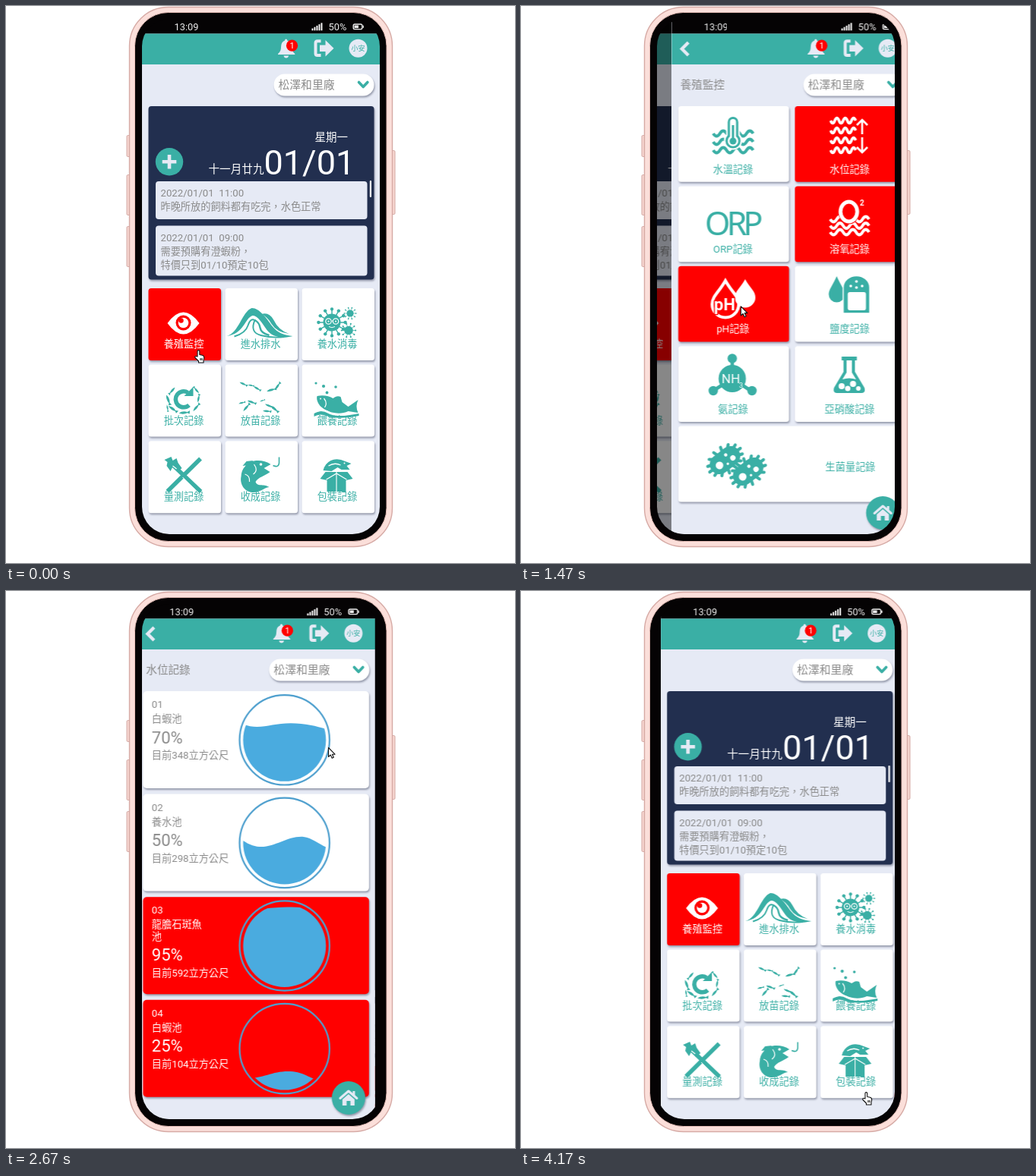
Animation, 670 px wide and 734 px high, one loop 4200 ms. Source, as an HTML page:

```html
<!DOCTYPE html>
<html lang="zh-Hant">
<head>
<meta charset="utf-8">
<title>養殖監控</title>
<style>
html, body { margin: 0; width: 100%; height: 100%; overflow: hidden; background: #fff; }
#stage { position: relative; width: 670px; height: 734px; overflow: hidden; }
#phone, #cursor { position: absolute; left: 0; top: 0; }
#display { position: absolute; left: 178.5px; top: 17px; width: 313px; height: 679px; border-radius: 36px; overflow: hidden; background: #050304; }
.page { position: absolute; left: 0; top: 0; width: 313px; height: 679px; will-change: transform; }
#notch { position: absolute; left: 92px; top: 0; width: 118px; height: 19px; background: #050304; z-index: 5; }
#cursor { z-index: 9; overflow: visible; }
text { font-family: Roboto, "Noto Sans CJK TC", "Noto Sans CJK", sans-serif; white-space: pre; }
.lift { filter: drop-shadow(1px 2px 1.2px rgba(70, 76, 100, .5)); }
</style>
</head>
<body>
<div id="stage">
  <svg id="phone" width="670" height="734">
    <g fill="#f7d6d0" stroke="#d3a8a3">
      <rect x="159" y="170.500" width="6" height="28" rx="1.500"/>
      <rect x="159" y="222.500" width="6" height="53" rx="1.500"/>
      <rect x="159" y="290.500" width="6" height="53" rx="1.500"/>
      <rect x="506" y="190.500" width="6" height="84" rx="1.500"/>
    </g>
    <rect x="162.500" y="1.500" width="346" height="711" rx="51" fill="#fbdfda" stroke="#d6aaa5" stroke-width="1.400"/>
    <rect x="169.500" y="8.500" width="331.500" height="697" rx="44" fill="#050304" stroke="#e3bbb5"/>
  </svg>
  <div id="display"><div id="notch"></div></div>
  <svg id="cursor" width="14" height="20" fill="#fff" stroke="#111" stroke-width="1.100" stroke-linejoin="round">
    <path id="arrow" d="M.5 .5V12.500L3.200 10L5.200 14.300L7.300 13.300L5.400 9.200H9Z"/>
    <path id="hand" d="M4 9V2a1.400 1.400 0 0 1 2.800 0V6.500L10.500 7.300Q13 8 12.700 11L12 14V17H5.500V15L1 10.500Q.3 8.300 2.200 8.500ZM8 11v3M10 11v3"/>
  </svg>
</div>
<script>
(() => {
const TEAL = '#3aafa5', MIST = '#e6eaf5', NAVY = '#222f4f', RED = '#ff0000', GRAY = '#8a8a8a', BLUE = '#4aabdf';
const WIDTH = 313, LOOP = 4200;

// Markup helpers
const rect = (x, y, w, h, fill, rx = 0, more = '') =>
  `<rect x="${x}" y="${y}" width="${w}" height="${h}" rx="${rx}" fill="${fill}" ${more}/>`;
const disc = (x, y, r, fill, more = '') => `<circle cx="${x}" cy="${y}" r="${r}" fill="${fill}" ${more}/>`;
const path = (d, fill = TEAL, more = '') => `<path d="${d}" fill="${fill}" ${more}/>`;
const line = (d, color, w, more = '') =>
  `<path d="${d}" fill="none" stroke="${color}" stroke-width="${w}" ${more}/>`;
const text = (x, y, s, size, fill, more = '') =>
  `<text x="${x}" y="${y}" font-size="${size}" fill="${fill}" ${more}>${s}</text>`;
const MID = 'text-anchor="middle"', LIFT = 'class="lift"', ROUND = 'stroke-linecap="round" stroke-linejoin="round"';
const label = (x, y, s, fill = TEAL) => text(x, y, s, 13.2, fill, MID);
const shift = (dx, s) => `<g transform="translate(${dx})">${s}</g>`;
const wave = (x, y, n, w, h, color, sw = 4) =>
  line(`M${x} ${y}q${w / 4} ${h} ${w / 2} 0` + `t${w / 2} 0`.repeat(n * 2 - 1), color, sw);
const drop = (x, tip, y, r, fill, more) =>
  path(`M${x} ${tip}C${x + r * .5} ${tip + (y - tip) * .5} ${x + r} ${y - r * .6} ${x + r} ${y}A${r} ${r} 0 0 1 ${x - r} ${y}C${x - r} ${y - r * .6} ${x - r * .5} ${tip + (y - tip) * .5} ${x} ${tip}Z`, fill, more);
const fish = (x, y, len, turn) =>
  path('M-5 0Q-1 -2.200 3 -.4L5.500 -1.600L5 1.600L3 .4Q-1 2 -5 0Z', TEAL,
    `transform="translate(${x} ${y}) rotate(${turn}) scale(${len / 10})"`);
const spikes = (n, r1, r2, ratio = 1) => {
  let d = '';
  for (let i = 0; i < n; i++) {
    const a = i * 2 * Math.PI / n, c = Math.cos(a), s = Math.sin(a) * ratio;
    d += `M${(c * r1).toFixed(1)} ${(s * r1).toFixed(1)}L${(c * r2).toFixed(1)} ${(s * r2).toFixed(1)}`;
  }
  return d;
};
const virus = (x, y, r, reach, n) => `<g transform="translate(${x} ${y})">` + disc(0, 0, r, TEAL) +
  line(spikes(n, r - 1, reach), TEAL, r / 8) +
  line(spikes(n, reach, reach + .2), TEAL, r / 2.7, ROUND) + '</g>';

// Parts shared by the pages
const chevron = line('M464 100.500L469.700 106.500L475.400 100.500', TEAL, 3.6, ROUND);
const bars = [0, 1, 2, 3, 4].map(i => rect(402 + i * 3, 29.5 - i * 1.8, 1.9, 2.8 + i * 1.8, '#fff')).join('');
const header = (title = '') =>
  rect(178, 17, 314, 680, MIST) + rect(178, 17, 314, 19.5, '#050304') + rect(178, 36.5, 314, 40.5, TEAL) +
  text(221, 31.5, '13:09', 12.8, '#eee') + bars + text(424, 31.5, '50%', 12.8, '#eee') +
  rect(456.7, 24, 11.6, 6.6, 'none', 1.8, 'stroke="#eee" stroke-width="1.400"') + rect(458, 25.5, 5.5, 3.6, '#eee') + rect(469, 25.7, 1.4, 3.2, '#eee') +
  path('M368 43.500q1.800 0 1.800 2q6 1.500 6 9q0 5.500 4 8.500v1H357.500v-1q4-3 4-8.500q0-7.500 5-9q0-2 1.500-2ZM365 65.500h6.600q-.6 3-3.300 3t-3.300-3Z', MIST) +
  disc(376, 52.2, 7.6, RED) + text(376, 56.2, '1', 11, '#fff', MID) +
  line('M414 46.200H409.500Q407 46.200 407 48.700V62.500Q407 65 409.500 65H414', MIST, 4) +
  path('M412.500 51.500H420V45L431 55.700L420 66.400V60H412.500Z', MIST) +
  disc(463, 55.7, 12, MIST) + text(463, 59.2, '小安', 9, TEAL, MID) +
  (title && line('M200.500 48L192 56.500L200.500 65', MIST, 4.2) + text(190, 108.5, title, 14.6, GRAY)) +
  rect(352, 89.5, 132, 29, '#fff', 14.5, LIFT) + text(358, 109, '松澤和里廠', 14.8, GRAY) + chevron;
const homeButton = disc(456.5, 668, 22, TEAL, LIFT) +
  line('M445.500 668.500L456.500 659L467.500 668.500', MIST, 3, ROUND) +
  rect(462, 659, 3, 6, MIST) + path('M448.500 670L456.500 663L464.500 670V678H459V672H454V678H448.500Z', MIST);

// Icons of the first page
const eye = path('M212 418Q233 389 254 418Q233 447 212 418Z', '#fff') + disc(233, 417.5, 10, RED) +
  disc(233, 417.5, 6.8, '#fff') + disc(230, 414.5, 3.2, RED);
const surf = path('M290 435C306 431 310 403 323 398C333 398 342 411 350 422C357 431 366 434 377 435C362 439 350 436 343 427C336 417 330 407 324 408C314 411 313 432 290 435Z') +
  path('M336 406Q346 403 352 414Q358 427 372 432Q356 430 349 419Q344 410 336 406Z') +
  line('M300 435.500Q315 431 318 421T327 414Q320 430 335 434T366 436', TEAL, 1.9) +
  line('M327 414Q333 417 334 424T346 434', TEAL, 2.4);
const germs = virus(428.5, 417, 11.5, 17.5, 12) + virus(452.5, 405, 4.6, 7.5, 10) + virus(450.5, 427.5, 5.8, 9, 10) +
  line('M428.500 415h1', MIST, 1.2) +
  [424, 433.5].map(x => disc(x, 415.5, 3.7, TEAL, 'stroke="#fff" stroke-width="1.200"') + disc(x, 415.5, 1.1, '#fff')).join('') +
  line('M424.500 422.500Q428.500 425 432.500 422.500', '#fff', 1);
const batch = line('M240.500 526A10.500 10.500 0 1 1 239 509.500', TEAL, 5.5) + path('M234 514H246V502Z') +
  fish(213, 519, 14, 70) + fish(218, 507, 12, 130) + fish(219, 531, 14, 35) + fish(234, 536, 14, -5) +
  fish(250, 529, 13, -50) + fish(253, 517, 11, -80) + fish(250, 506, 11, -130) + fish(212, 530, 9, 80);
const fry = [[312, 498, 11, 25], [322, 500, 8, 10], [330, 504, 11, 30], [349, 506, 13, -15], [357, 501, 12, -55], [310, 523, 9, -15],
  [316, 529, 13, -50], [323, 522, 12, 20], [346, 527, 12, 25], [353, 531, 13, 40], [343, 534, 11, 5], [337, 520, 7, -20]]
  .map(f => fish(...f)).join('');
const feed = [[407.5, 497, 1.6], [417.5, 501, 2.1], [433.5, 502, 1.8], [422, 509.5, 1.9]].map(d => disc(...d, TEAL)).join('') +
  path('M409 514C417 512 425 514 430 517Q435 513 440 515L442 522L450 528L463 519Q459 528 463 536L450 534C437 540 421 535 413 527C409 522 408 518 409 514Z') +
  path('M405 537Q414 531 424 537T464 537V540Q441 545 424 541Q413 536 405 541Z') +
  line('M418 517Q423 523 419 529', '#fff', 1.2) + disc(413.5, 517.5, 1, '#fff') + line('M408 535Q418 530 427 536T452 538', '#fff', 1);
const caliper = line('M255.500 596.500L212 639.500', TEAL, 5.5) + line('M215 601L256 640', TEAL, 5.5) +
  path('M208 598L217 594L219 599L224 596L226 602L231 609L225 614L219 607L216 613L211 606L212 601Z') +
  line('M219 606L224 610', '#fff', 1.2) + line('M232 621L248 637', '#fff', 1);
const harvest = path('M314 607C320 597 338 597 348 604L339 609L347 614C341 619 331 621 328 627C330 634 338 629 346 634C338 635 335 641 324 641C313 640 307 630 309 620C309 615 311 610 314 607Z') +
  path('M311 606L316 600L325 599L318 605Z') + disc(335, 604, 1.8, '#fff') + line('M326 604Q332 612 325 617M314 617Q321 619 320 627', '#fff', 1.2) +
  line('M359 594.500V602Q358.500 609 351 605.500', TEAL, 1.6);
const pack = path('M417 612Q419 603 427 599Q436 595 446 600L454 603L448 606L452 611H441L436 608L428 613Z') +
  line('M424 606Q432 601 440 605', '#fff', 1.3) + disc(445, 602.5, 1, '#fff') +
  path('M420 614H449L456 623L447 625V640H422V625L413 623Z') + line('M434.500 614V640M421 624L434.500 616L448 624', '#fff', 1.1);

const tiles = [['養殖監控', eye], ['進水排水', surf], ['養水消毒', germs], ['批次記錄', batch], ['放苗記錄', fry],
  ['餵養記錄', feed], ['量測記錄', caliper], ['收成記錄', harvest], ['包裝記錄', pack]];
const note = (y, h, lines) => rect(196.5, y, 278.5, h, MIST, 4) +
  lines.map((s, i) => text(203, y + 20 + i * 18.4, s, 13.2, GRAY)).join('');
const homePage = header() +
  rect(187, 132, 297, 228.5, NAVY, 4, LIFT) +
  text(449.5, 178, '星期一', 14.5, '#fff', 'text-anchor="end"') +
  text(266, 219.5, '十一月廿九', 14.6, '#fff') + text(339, 221.5, '01/01', 45, '#fff') +
  disc(214.5, 205.3, 18.2, TEAL) + line('M214.500 196V214.600M205.200 205.300H223.800', MIST, 4.6) +
  note(231, 50, ['2022/01/01  11:00', '昨晚所放的飼料都有吃完，水色正常']) +
  note(289.5, 66, ['2022/01/01  09:00', '需要預購宥澄蝦粉，', '特價只到01/10預定10包']) +
  rect(478.3, 230, 2.2, 22, '#fff', 1) +
  tiles.map(([name, icon], i) => {
    const x = 187 + i % 3 * 101, y = 372 + Math.floor(i / 3) * 100.6;
    return rect(x, y, 95.5, 95, i ? '#fff' : RED, 3.5, LIFT) + icon + label(x + 46.5, y + 78.2, name, i ? TEAL : '#fff');
  }).join('');

// Icons of the monitoring page
const thermo = [168, 179, 190].map(y => wave(232, y, 3, 17.5, 7, TEAL)).join('') +
  path('M250 153a8 8 0 0 1 16 0V170a11 11 0 1 1 -16 0Z', TEAL, 'stroke="#fff" stroke-width="2"') +
  path('M254 153a4 4 0 0 1 8 0V172a7 7 0 1 1 -8 0Z', '#fff') +
  disc(258, 178, 4.5, TEAL) + line('M258 157V178', TEAL, 3);
const level = [151, 164, 177, 190].map(y => wave(386.5, y, 3, 11, 7, '#fff', 3.6)).join('') +
  line('M428 169V150M421 157L428 150L435 157M428 173V193M421 186L428 193L435 186', '#fff', 2.6);
const orp = text(221, 301.5, 'ORP', 45, TEAL, 'style="font:500 43px \'Noto Sans\',sans-serif;letter-spacing:-5px"');
const oxygen = [281, 289.5, 298].map(y => wave(386, y, 3, 17, 7, '#fff', 3.8)).join('') +
  `<ellipse cx="410.500" cy="271" rx="14" ry="16.500" fill="${RED}"/><ellipse cx="410.500" cy="271" rx="11" ry="13" fill="${RED}" stroke="#fff" stroke-width="5"/>` +
  text(425, 263, '2', 10, '#fff', 'font-weight="700"');
const acid = drop(248, 362, 393, 17.5, 'none', 'stroke="#fff" stroke-width="4"') +
  drop(274, 360, 384, 13.5, '#fff') +
  text(233, 401, 'pH', 22, '#fff', `font-weight="700" stroke="${RED}" stroke-width="2.500" paint-order="stroke"`);
const salt = drop(394.5, 356, 380, 10.5, TEAL) +
  path('M403 405V371A17.500 15.500 0 0 1 438 371V405Z', TEAL, 'stroke="#fff" stroke-width="1.500"') + rect(409, 377, 24, 24, '#fff', 3) +
  [[413, 369], [420.5, 363], [428, 369], [420.5, 371]].map(([x, y]) => disc(x, y, 1.8, '#fff')).join('');
const ammonia = line('M257 465V491L232 507M257 491L283 508', TEAL, 4.5) + disc(257, 491, 18, TEAL) +
  [[257, 464.5], [232, 507], [283, 507]].map(([x, y]) => disc(x, y, 6.2, TEAL)).join('') +
  text(243, 497, 'NH', 17, '#fff') + text(266, 503, '3', 9, '#fff');
const flask = path('M401 462H421V467H418.500V482L431 503Q433 510 427 510H395Q389 510 391 503L403.500 482V467H401Z') +
  path('M407.500 467H414.500V483L420 492Q411 489 402 492L407.500 483Z', '#fff') +
  [[401, 501, 4], [409, 504, 3.5], [416, 498, 4], [423, 504, 3]].map(d => disc(...d, '#fff')).join('');
const microbe = (x, y) => `<g transform="translate(${x} ${y}) rotate(-38)">` + rect(-22, -13, 44, 26, TEAL, 13) +
  line(spikes(14, 18, 25.5, .68), TEAL, 4, ROUND) +
  disc(-10, 1, 5, '#fff') + disc(5, -5, 2.2, '#fff') + disc(10, 4, 3.5, '#fff') + disc(0, 6, 1.6, '#fff') + '</g>';
const microbes = microbe(247.5, 598.5) + microbe(278, 613.5);

const probes = [['水溫記錄', thermo], ['水位記錄', level, 1], ['ORP記錄', orp], ['溶氧記錄', oxygen, 1],
  ['pH記錄', acid, 1], ['鹽度記錄', salt], ['氨記錄', ammonia], ['亞硝酸記錄', flask]];
const monitorPage = header('養殖監控') + shift(1.3, probes.map(([name, icon, alert], i) => {
  const x = i % 2 ? 339.5 : 186, y = 132 + (i >> 1) * 105.4;
  return rect(x, y, 145.7, 99.8, alert ? RED : '#fff', 3.5, LIFT) + icon + label(x + 72, y + 87.5, name, alert ? '#fff' : TEAL);
}).join('') + rect(186, 553.5, 299, 100, '#fff', 3.5, LIFT) + microbes + label(412.5, 611.5, '生菌量記錄')) + homeButton;

// Water level page: the surface curve is relative to the gauge centre
const ponds = [
  ['01', ['白蝦池'], '70%', 348, 'M-60 -23C-35 -11 -20 -22 8 -22C30 -22 45 -17 60 -13'],
  ['02', ['養水池'], '50%', 298, 'M-60 -7C-25 22 -5 -10 25 -8C38 -6 45 2 60 8'],
  ['03', ['龍膽石斑魚', '池'], '95%', 592, 'M-60 -46C-30 -49 -10 -51 10 -51C30 -50 45 -50 60 -46'],
  ['04', ['白蝦池'], '25%', 104, 'M-60 40C-25 40 -18 29 8 30C28 31 30 40 60 46']
];
const gauge = (x, y, surface, i) => `<g transform="translate(${x} ${y})">` +
  `<clipPath id="well${i}"><circle r="54.500"/></clipPath>` + disc(0, 0, 59.2, 'none', 'stroke="#4d9fce" stroke-width="2.200"') +
  path(surface + 'V60H-60Z', BLUE, `clip-path="url(#well${i})"`) + '</g>';
const levelPage = header('水位記錄') + shift(6, ponds.map(([no, name, share, volume, surface], i) => {
  const y = 132 + i * 135.6, ink = i > 1 ? '#fff' : GRAY, extra = (name.length - 1) * 15.3;
  return rect(180, y, 297.5, 128, i > 1 ? RED : '#fff', 5, LIFT) + text(191.5, y + 22, no, 13.2, ink) +
    name.map((s, k) => text(191.5, y + 41 + k * 15.3, s, 13.2, ink)).join('') +
    text(191.5, y + 68.5 + extra, share, 22, ink) + text(191.5, y + 89.3 + extra, `目前${volume}立方公尺`, 13.2, ink) +
    gauge(366.3, y + 64.3, surface, i);
}).join('')) + homeButton;

// Pages and timeline
const display = document.getElementById('display');
const pages = [homePage, monitorPage, levelPage].map(body => {
  display.insertAdjacentHTML('beforeend', `<svg class="page" viewBox="178.5 17 ${WIDTH} 679">${body}${rect(178, 17, 314, 680, '#000', 0, 'class="dim" opacity="0"')}</svg>`);
  const el = display.lastElementChild;
  return { el, dim: el.querySelector('.dim') };
});
const moves = [
  { at: 1167, from: 0, to: 1, dir: 1, rate: 1 },
  { at: 2147, from: 1, to: 2, dir: 1, rate: 1.1 },
  { at: 3558, from: 2, to: 0, dir: -1, rate: 1 }
];
// Damped spring: stiffness 100, damping 15, mass 1
const spring = s => {
  const w = Math.sqrt(100 - 7.5 * 7.5);
  return 1 - Math.exp(-7.5 * s) * (Math.cos(w * s) + 7.5 / w * Math.sin(w * s));
};
const ease = (t, a, b) => {
  const k = Math.min(1, Math.max(0, (t - a) / (b - a)));
  return k * k * (3 - 2 * k);
};
const place = (page, x, z, shade) => {
  page.el.style.visibility = 'visible';
  page.el.style.transform = `translateX(${x.toFixed(2)}px)`;
  page.el.style.zIndex = z;
  page.dim.setAttribute('opacity', shade.toFixed(3));
};
const cursor = document.getElementById('cursor');
const arrow = document.getElementById('arrow'), hand = document.getElementById('hand');

function draw() {
  const t = performance.now() % LOOP;
  for (const p of pages) p.el.style.visibility = 'hidden';
  const move = moves.filter(m => m.at <= t).pop();
  if (move) {
    const k = spring((t - move.at) / 1000 * move.rate);
    place(pages[move.from], -move.dir * k * WIDTH * .25, 1, Math.min(1, k) * .5);
    place(pages[move.to], move.dir * (1 - k) * WIDTH, 2, 0);
  } else place(pages[0], 0, 1, 0);

  const a = ease(t, 1330, 1780), b = ease(t, 2760, 3330);
  cursor.style.transform = `translate(${248 + 176 * a + 25 * b}px, ${453 - 247 * a + 454 * b}px)`;
  const pointing = t < 1167 || (t >= 1780 && t < 2147) || t >= 3330;
  hand.style.display = pointing ? '' : 'none';
  arrow.style.display = pointing ? 'none' : '';
  requestAnimationFrame(draw);
}
draw();
})();
</script>
</body>
</html>
```
